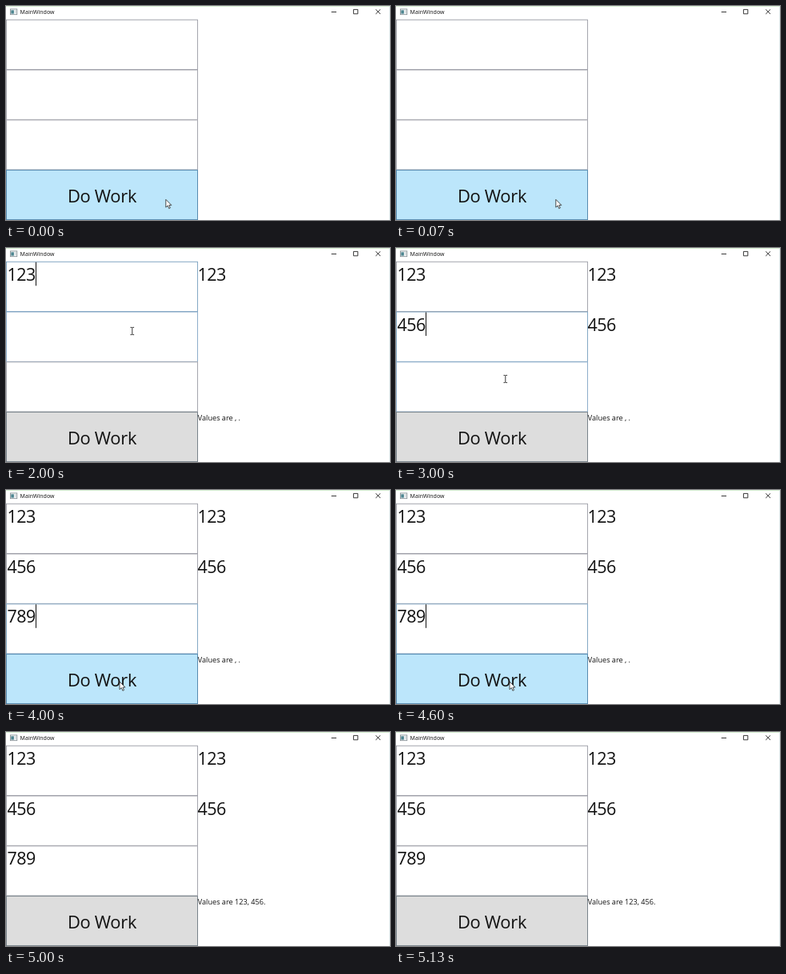
An HTML page for the animation above (5.99 s loop, 480 by 268 pixels).

```html
<!DOCTYPE html>
<html lang="en">
<head>
<meta charset="utf-8">
<title>MainWindow</title>
<style>
html, body { margin: 0; width: 100%; height: 100%; overflow: hidden; background: #fff; }
svg { display: block; width: 100vw; height: 100vh; }
text { font-family: "Open Sans", "Noto Sans", sans-serif; fill: #111; white-space: pre; }
.big { font-size: 21.5px; letter-spacing: -.5px; }
.small { font-size: 9.15px; }
.box { fill: #fff; stroke-width: .9; }
.line { fill: none; stroke: #222; stroke-width: .9; }
</style>
</head>
<body>
<svg id="stage" viewBox="0 0 480 268">
  <rect width="480" height="268" fill="#fff"/>
  <path d="M0 .5H480" stroke="#d6efd2"/>
  <path d="M479.6 0V268" stroke="#d9e4e8" stroke-width=".8"/>
  <g id="icon">
    <rect x="5.4" y="3.9" width="8.4" height="6.8" fill="#f4f7f8" stroke="#7d878c" stroke-width=".8"/>
    <rect x="6.3" y="5.3" width="3.6" height="4.3" fill="#4d8590"/>
    <path d="M10.8 6H13M10.8 8H13" stroke="#b5bec2" stroke-width=".8"/>
  </g>
  <text x="17.6" y="10.1" font-size="7.05">MainWindow</text>
  <path class="line" d="M406.7 7.5H413M434.4 4.4h5.4v5.4h-5.4zM462.2 4.3l5.8 5.8M468 4.3l-5.8 5.8"/>
  <g id="boxes"></g>
  <rect id="button" x=".5" y="205.6" width="239" height="62" stroke-width=".9"/>
  <text x="120" y="245.9" font-size="21.9" letter-spacing="-.3" text-anchor="middle">Do Work</text>
  <g id="labels"></g>
  <text id="summary" class="small" x="239.8" y="216.2"></text>
  <path id="caret" d="M0 0V29.5" stroke="#111" stroke-width="1"/>
  <circle id="click" cx="157.4" cy="60.8" r="4.4" fill="#e8876f" opacity=".85"/>
  <path id="beam" class="line" d="M-2.3 -4.6H-.6L0 -4L.6 -4.6H2.3M0 -4V4M-2.3 4.6H-.6L0 4L.6 4.6H2.3"/>
  <path id="arrow" d="M0 0V9.8L2.3 7.7L3.9 11.3L5.5 10.6L4 7.1H7Z" fill="#fff" stroke="#222" stroke-width=".8"/>
</svg>
<script>
const LOOP = 5990;
const ROW = 62.75, TOP = 17;
const VALUES = ["123", "456", "789"];
const GREY = "#9c9da6", FOCUS = "#789fbe", HOVER = "#83a6c6";
const byId = id => document.getElementById(id);

// typed: filled inputs; shown: filled labels; focus and hover: row index, 3 is the button
const STATES = [
  { at: 0, typed: 0, shown: 0, focus: -1, hover: 3, arrow: [199.8, 242.3], summary: "" },
  { at: 1000, typed: 0, shown: 0, focus: 0, hover: 0, beam: [158.4, 61], click: true, summary: "Values are , ." },
  { at: 2000, typed: 1, shown: 1, focus: 0, hover: 1, beam: [157.8, 104], summary: "Values are , ." },
  { at: 3000, typed: 2, shown: 2, focus: 1, hover: 2, beam: [136.8, 164], summary: "Values are , ." },
  { at: 4000, typed: 3, shown: 2, focus: 2, hover: 3, arrow: [142, 240], summary: "Values are , ." },
  { at: 5000, typed: 3, shown: 2, focus: -1, hover: -1, summary: "Values are 123, 456." }
];

function add(parent, tag, attrs, label = "") {
  const node = document.createElementNS("http://www.w3.org/2000/svg", tag);
  for (const key in attrs) node.setAttribute(key, attrs[key]);
  node.textContent = label;
  byId(parent).append(node);
  return node;
}

const rows = VALUES.map((value, i) => {
  const y = TOP + i * ROW;
  return {
    box: add("boxes", "rect", { class: "box", x: .5, y: y + .3, width: 239, height: ROW - .5 }),
    input: add("labels", "text", { class: "big", x: 1.4, y: y + 23.8 }, value),
    label: add("labels", "text", { class: "big", x: 239.4, y: y + 23.8 }, value)
  };
});

function show(node, visible) {
  node.setAttribute("visibility", visible ? "visible" : "hidden");
}

function place(id, point) {
  const node = byId(id);
  show(node, point);
  if (point) node.setAttribute("transform", `translate(${point})`);
}

function render(time) {
  const s = STATES.filter(state => state.at <= time).pop();
  rows.forEach((row, i) => {
    row.box.setAttribute("stroke", i === s.focus ? FOCUS : i === s.hover ? HOVER : GREY);
    show(row.input, i < s.typed);
    show(row.label, i < s.shown);
  });
  const hot = s.hover === 3;
  byId("button").setAttribute("fill", hot ? "#bce6fb" : "#dddddd");
  byId("button").setAttribute("stroke", hot ? "#4a80a8" : "#6d7880");
  byId("summary").textContent = s.summary;
  place("caret", s.focus >= 0 && [s.typed ? 37.5 : 2.5, TOP + s.focus * ROW + .8]);
  place("arrow", s.arrow);
  place("beam", s.beam);
  show(byId("click"), s.click);
}

const start = performance.now();
function tick() {
  render((performance.now() - start) % LOOP);
  requestAnimationFrame(tick);
}
tick();
</script>
</body>
</html>
```
